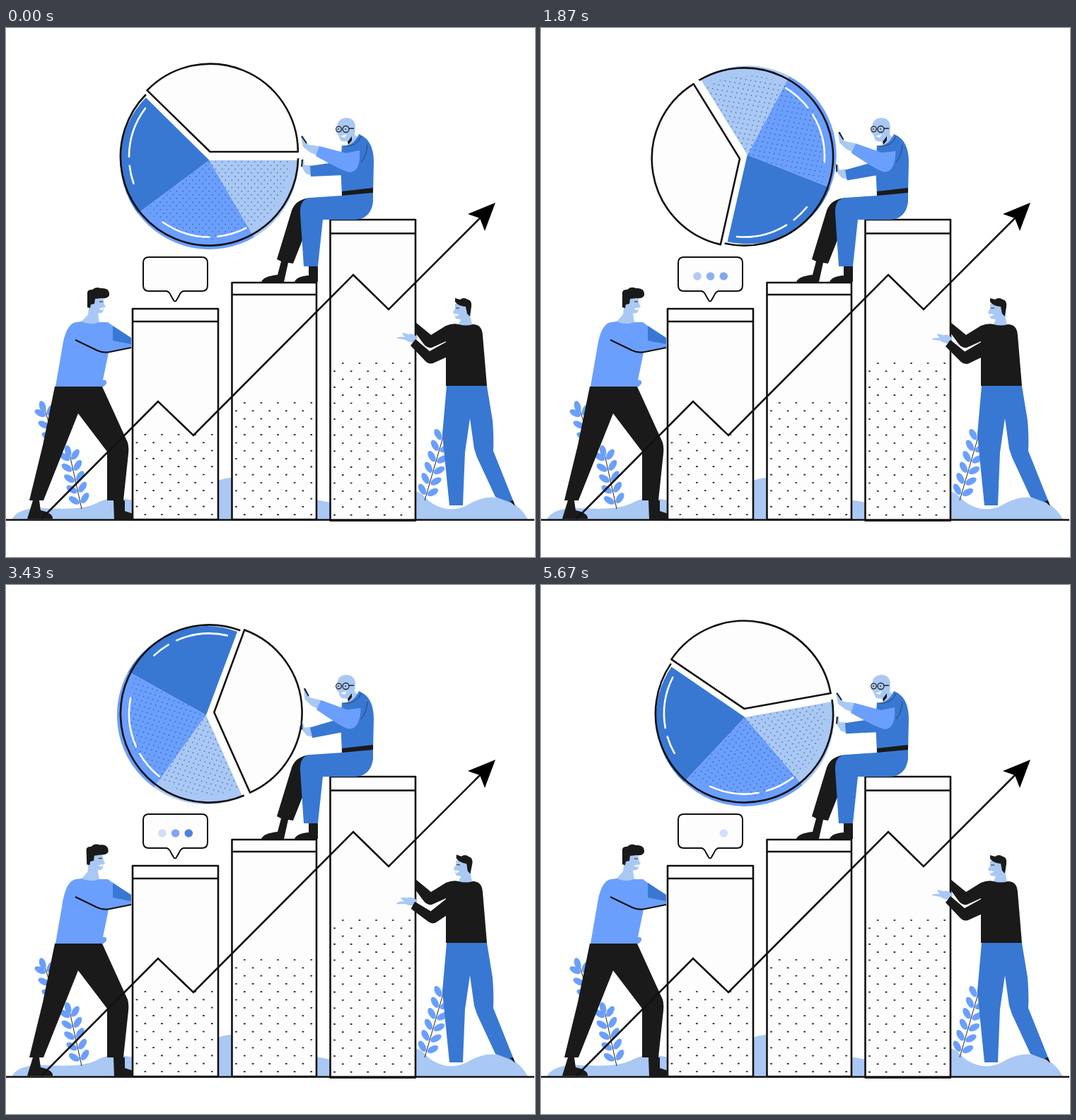
An HTML page that plays this animation: 748 by 748 pixels, repeating every 5.73 s.

```html
<!DOCTYPE html>
<html lang="en">
<head>
<meta charset="utf-8">
<title>Growth chart</title>
<style>
html, body { margin: 0; width: 100%; height: 100%; overflow: hidden; background: #fff; }
svg { display: block; width: 100vw; height: 100vh; }
.dark { fill: #3878d3; }
.mid { fill: #6b9ffe; }
.light { fill: #aac8f4; }
.black { fill: #1a1a1a; }
.line { fill: none; stroke: #111; stroke-width: 2.6; stroke-linejoin: round; }
.paper { fill: #fdfdfd; }
.shine { fill: none; stroke: #fff; stroke-width: 2.6; stroke-linecap: round; }
.fine { fill: none; stroke: #222; stroke-width: 1; }
</style>
</head>
<body>
<svg viewBox="0 0 748 748">
  <defs>
    <pattern id="grain" width="9.2" height="10.4" patternUnits="userSpaceOnUse">
      <circle cx="2" cy="2" r=".75" fill="#24467f"/>
      <circle cx="6.6" cy="7.2" r=".75" fill="#24467f"/>
    </pattern>
  </defs>

  <!-- ground and plants -->
  <g class="light">
    <path d="M8 695C14 684 28 678 52 679C85 680 110 681 128 672C144 663 160 663 180 668V695Z"/>
    <path d="M298 695V641Q308 636 321 636V695ZM438 695V667L460 671V695Z"/>
    <path d="M577 695V655C590 656 594 668 606 674C622 683 640 682 655 673C675 662 693 661 708 668C724 674 732 684 738 695Z"/>
  </g>
  <g id="plants"></g>

  <!-- pie -->
  <g id="pie"></g>

  <!-- bars -->
  <g id="bars"></g>
  <path class="line" d="M0 695.5H747"/>

  <!-- speech bubble -->
  <path class="line paper" style="stroke-width:2" d="M202 324H277Q285 324 285 332V364Q285 372 277 372H251Q247 373 245 378L241 385Q239 388 237 385L233 378Q231 373 227 372H202Q194 372 194 364V332Q194 324 202 324Z"/>
  <g id="typing"></g>

  <!-- man on the left -->
  <g id="headL">
    <path class="light" d="M119 378L137 380L139 391L141 394L138 396L137 402Q133 404 130 403L132 417Q119 424 106 416L116 405Z"/>
    <path class="black" d="M115 395V377Q114 369 122 370Q127 365 134 368Q147 367 146 378Q144 383 135 382L126 383L125 390L120 391L119 396Z"/>
    <path class="fine" d="M132 387H137"/>
    <path d="M131 397L138 395L136 399Z" fill="#fff"/>
  </g>
  <path class="mid" d="M99 416L107 415Q119 421 131 416L144 416L152 422L177 440V452L145 459L137 498Q143 497 142 503L138 507H70L79 455Q84 418 99 416Z"/>
  <path class="dark" d="M151 421L177 438V447L151 442Z"/>
  <path class="line" style="stroke-width:2.2" d="M98 441L129 456Q138 460 147 458L177 452"/>
  <path class="black" d="M69 507H136L172 586Q174 592 173 602L166 668H168V683L180 687V695H153L152 668H143V599L102 545L53 668H47L49 682Q67 686 66 694H30L38 668H33L52 590Z"/>

  <!-- man on the right -->
  <path class="dark" d="M623 506H680L688 555Q690 580 689 598L719 673L692 663L666 607L662 595L656 552L649 600L646 675H627L617 575Z"/>
  <path class="black" d="M712 669L717 668L720 676Z"/>
  <g id="headR">
    <path class="light" d="M635 390H652L656 406L659 419Q648 424 640 419L643 412L636 411L634 405L632 402L635 397Z"/>
    <path class="black" d="M635 387V382L642 384Q647 380 653 384Q659 385 658 394L656 408L652 404L650 394Q639 393 635 387Z"/>
    <path class="fine" d="M636 396H641"/>
    <path d="M634 404L641 405L636 408Z" fill="#fff"/>
  </g>
  <path class="black" d="M579 416L601 434L622 421Q632 417 640 419Q650 422 660 419Q673 419 674 434L680 506H622V443L602 452Q595 453 590 446L579 431Z"/>
  <g id="armR">
    <path class="light" d="M579 444Q571 446 565 441L553 439Q552 436 564 437L560 432Q561 430 569 433Q576 431 582 438Z"/>
    <path class="black" d="M579 440L599 457L626 442V464L606 473Q599 477 593 471L572 449Z"/>
  </g>

  <!-- seated man -->
  <path class="black" d="M433 240Q410 241 404 258L383 327L389 330L384 349Q364 351 361 359H393L399 332L406 333L425 285Z"/>
  <path class="black" d="M428 335H441V359H408Q411 351 428 350Z"/>
  <path class="dark" d="M475 237L430 240Q415 242 416 262L421 337H441L448 271H493Q516 270 519 246V232Z"/>
  <g id="armFar">
    <path class="light" d="M434 209L424 206L418 196L417 187L421 185L422 194H431Z"/>
    <path class="fine" style="stroke-width:2" d="M418 196L419 186"/>
    <path class="dark" d="M430 195L478 188V208L431 210Z"/>
  </g>
  <path class="light" d="M469 135Q472 127 482 127Q494 128 494 141L493 151L500 157Q494 170 482 166L487 160Q478 162 473 159L470 151L467 148Z"/>
  <path class="dark" d="M499 150Q520 158 520 190L519 235L475 238L473 191L475 166Q490 169 499 150Z"/>
  <path class="fine" d="M478 167Q497 168 502 153M511 165Q510 180 502 190" opacity=".6"/>
  <path class="black" d="M475 231L519 226V233L475 237ZM483 161L489 153V159L484 165Z"/>
  <path d="M473 153L482 150L479 155Z" fill="#fff"/>
  <g class="fine" style="stroke-width:1.3"><circle cx="470.5" cy="143" r="3.8"/><circle cx="480.5" cy="143" r="4.5"/><path d="M485 142H492M470 142V144M480 142V144"/></g>
  <g id="armNear">
    <path class="light" d="M443 167L427 165L420 152L417 153L420 168L430 176L440 180Z"/>
    <path class="fine" style="stroke-width:2" d="M418 153L425 163"/>
    <path class="mid" d="M443 167L481 177L500 173Q502 203 486 204Q477 203 438 181Z"/>
  </g>

  <!-- trend arrow -->
  <path class="line" style="stroke-linejoin:miter" d="M50 694L215 528L265 576L491 349L541 398L672 267"/>
  <path d="M692 247L677 287L670 269L653 263Z"/>
</svg>
<script>
const LOOP = 5730, STEPS = 71, CX = 287.5, CY = 182;
const $ = id => document.getElementById(id);
const rad = a => a * Math.PI / 180;
const at = (x, y, r, a) => `${x + r * Math.cos(rad(a))} ${y + r * Math.sin(rad(a))}`;
const arc = (x, y, r, a, b) => `M${at(x, y, r, a)}A${r} ${r} 0 ${b - a > 180 ? 1 : 0} 1 ${at(x, y, r, b)}`;
const sector = (x, y, r, a, b) => `${arc(x, y, r, a, b)}L${x} ${y}Z`;
const path = (d, attrs) => `<path d="${d}" ${attrs}/>`;

$('pie').innerHTML =
  path(sector(CX, 187, 126, 143.3, 224.6), 'class="dark"') +
  path(sector(CX, 187, 126, 59.8, 143.3), 'class="mid"') +
  path(sector(CX, 187, 126, 0, 59.8), 'class="light"') +
  path(sector(CX, 186, 113, 0, 142), 'fill="url(#grain)"') +
  path(arc(CX, CY, 125.6, 1, 224.5), 'class="line"') +
  [[160.6, 173.5], [180, 217], [90, 125.4], [62.8, 84]]
    .map(([a, b]) => path(arc(CX, CY, 113.5, a, b), 'class="shine"')).join('') +
  path(sector(288.5, 175, 124.3, -135.7, 0), 'class="line paper" style="fill:#fdfdfd"');

function bar(x, y, w, bottom, cap, dotsTop) {
  let s = `<rect class="line" style="fill:#fdfdfd" x="${x}" y="${y}" width="${w}" height="${bottom - y}"/>` +
    path(`M${x} ${cap}H${x + w}`, 'class="line"');
  for (let row = 0, py = dotsTop; py < bottom - 4; py += 11.3, row++)
    for (let px = x + (row % 2 ? 6 : 17.8); px < x + w - 3; px += 23.6)
      s += `<ellipse cx="${px}" cy="${py}" rx="1.6" ry="1.1" fill="#333"/>`;
  return s;
}
$('bars').innerHTML = bar(179, 397, 121, 695, 415, 575) +
  bar(319.5, 360, 119.5, 695, 377, 530) + bar(458.5, 271, 120.5, 696.5, 290.5, 474);

function plant(x0, y0, x1, y1, pairs) {
  const tilt = Math.atan2(y1 - y0, x1 - x0) * 180 / Math.PI;
  let s = path(`M${x0} ${y0}L${x1} ${y1}`, 'class="fine"');
  const leaf = (x, y, a) =>
    `<ellipse class="mid" cx="11" rx="8.5" ry="4.5" transform="translate(${x} ${y}) rotate(${a})"/>`;
  for (let i = 0; i < pairs; i++) {
    const k = (i + .4) / pairs, x = x0 + (x1 - x0) * k, y = y0 + (y1 - y0) * k;
    s += leaf(x, y, tilt - 45) + leaf(x, y, tilt + 45);
  }
  return s + leaf(x1, y1 + 6, tilt);
}
$('plants').innerHTML = plant(107, 680, 90, 603, 5) + plant(75, 605, 55, 540, 4) +
  plant(592, 668, 619, 575, 6);

// Colour stops of the typing dots: time, r, g, b.
const W = [253, 253, 253];
const typing = [
  [[0, ...W], [900, ...W], [1370, 171, 198, 243], [2370, 184, 207, 246], [3430, 207, 221, 248], [4370, 195, 213, 246], [5100, ...W], [LOOP, ...W]],
  [[0, ...W], [700, ...W], [770, 236, 238, 241], [1370, 155, 186, 240], [2370, 130, 167, 238], [3430, 128, 166, 242], [4370, 111, 156, 246], [5450, ...W], [LOOP, ...W]],
  [[0, ...W], [400, ...W], [770, 163, 191, 240], [1370, 140, 175, 237], [2370, 123, 161, 232], [3430, 80, 129, 220], [4370, 101, 144, 228], [5670, 208, 223, 250], [LOOP, ...W]]
];
$('typing').innerHTML = [221, 239.6, 258.3].map(x => `<circle cx="${x}" cy="351" r="5.8"/>`).join('');

function tint(stops, t) {
  const i = stops.findIndex(s => s[0] > t), a = stops[i - 1], b = stops[i];
  const k = (t - a[0]) / (b[0] - a[0]);
  return `rgb(${[1, 2, 3].map(c => Math.round(a[c] + (b[c] - a[c]) * k))})`;
}

const wave = x => Math.sin(Math.PI * x) ** 2;
const turn = (id, a, x, y, shift = '') => $(id).setAttribute('transform', `${shift}rotate(${a} ${x} ${y})`);

// The turn runs twice per loop with a short rest after the first.
function stepAt(t) {
  if (t < 2970) return Math.min(STEPS, Math.floor((t + 10) / 40)) % STEPS;
  return Math.floor((t - 2910) / 40);
}

function draw(now) {
  const t = now % LOOP, s = stepAt(t);
  turn('pie', s * 360 / STEPS, CX, CY);

  const push = wave(s / 35.5);
  turn('armNear', 6.5 * push, 490, 190);
  turn('armFar', -10 * push, 475, 198);

  const nod = s < 25 ? wave(s / 25) : s > 46 ? wave((s - 46) / 25) : 0;
  turn('headL', -2 * nod, 120, 416);
  turn('headR', 3 * nod, 648, 418);

  const reach = s < 24 ? wave(s / 48) : s < 52 ? wave((52 - s) / 56) : 0;
  turn('armR', -17 * reach, 603, 468, `translate(${6 * reach} ${6 * reach}) `);

  [...$('typing').children].forEach((dot, i) => dot.setAttribute('fill', tint(typing[i], t)));
}

const start = performance.now();
(function tick() {
  draw(performance.now() - start);
  requestAnimationFrame(tick);
})();
</script>
</body>
</html>
```
